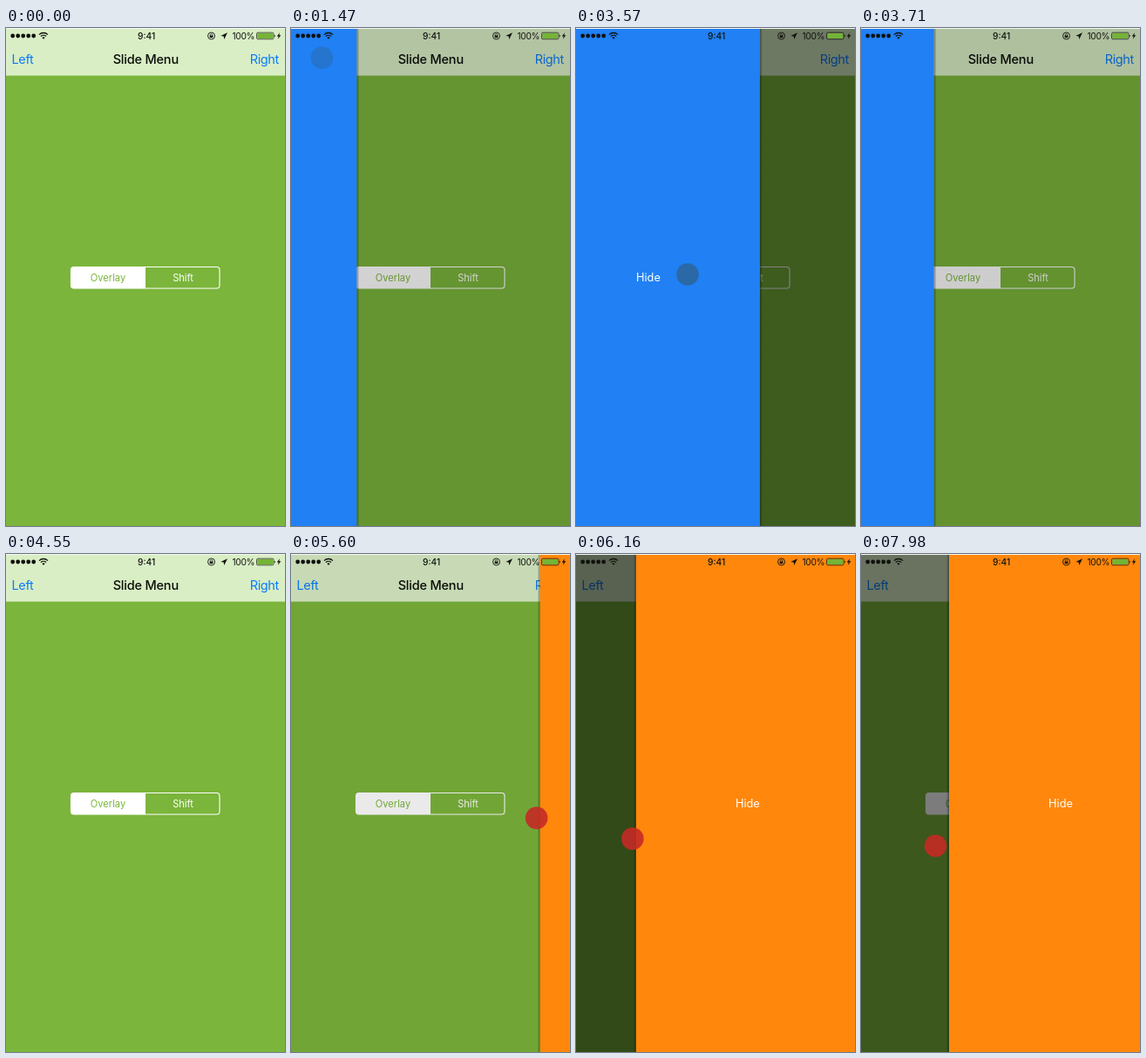
These frames come from a looping animation (320x570 px, 8000 ms). An HTML page:

```html
<!DOCTYPE html>
<html lang="en">
<head>
<meta charset="utf-8">
<title>Slide menu</title>
<style>
  html, body { margin: 0; width: 100%; height: 100%; overflow: hidden; background: #7bb53b; }
  svg { display: block; width: 100vw; height: 100vh; }
  text { font-family: Inter, Roboto, sans-serif; }
  .bar { font-size: 14.5px; letter-spacing: -.35px; fill: #0b7cf8; }
  .title { font-weight: 500; letter-spacing: -.2px; fill: #0a0c08; }
  .seg { font-size: 11.1px; text-anchor: middle; }
  .hide { font-size: 12.8px; text-anchor: middle; fill: #fff; }
  .status { font-size: 10.2px; fill: #10120e; }
</style>
</head>
<body>
<svg viewBox="0 0 320 570">
  <defs>
    <linearGradient id="fade">
      <stop offset="0" stop-color="#000" stop-opacity=".4"/>
      <stop offset="1" stop-color="#000" stop-opacity="0"/>
    </linearGradient>
  </defs>

  <rect width="320" height="570" fill="#7bb53b"/>
  <rect width="320" height="54.5" fill="#d9eec5"/>
  <rect width="320" height="1" fill="#f4f8f0"/>
  <text class="bar" x="6.5" y="41">Left</text>
  <text class="bar title" x="160.3" y="41" text-anchor="middle">Slide Menu</text>
  <text class="bar" x="313" y="41" text-anchor="end">Right</text>

  <path d="M160 273.5H78a3.5 3.5 0 0 0-3.5 3.5v17.500a3.500 3.500 0 0 0 3.500 3.500H160Z" fill="#fff"/>
  <rect x="74.500" y="273.500" width="170.500" height="24.500" rx="3.500" fill="none" stroke="#fff" stroke-width="1.100"/>
  <text class="seg" x="117" y="289.500" fill="#7bb53b">Overlay</text>
  <text class="seg" x="203" y="289.500" fill="#fff">Shift</text>

  <rect id="dim" y="1" width="320" height="569"/>

  <g id="left">
    <rect x="256" y="1" width="3" height="569" fill="url(#fade)"/>
    <rect y="1" width="256" height="569" fill="#2080f4"/>
    <text class="hide" x="128" y="290">Hide</text>
  </g>
  <g id="right">
    <rect x="-3" y="1" width="3" height="569" fill="url(#fade)" transform="matrix(-1 0 0 1 -3 0)"/>
    <rect y="1" width="256" height="569" fill="#ff870c"/>
    <text class="hide" x="128" y="290">Hide</text>
  </g>

  <g fill="#10120e">
    <g id="signal"></g>
    <g fill="none" stroke="#10120e" stroke-width="1.300">
      <path d="M38 7.600a7 7 0 0 1 10 0M39.900 9.600a4.400 4.400 0 0 1 6.200 0"/>
      <circle cx="235.500" cy="9" r="4" stroke-width=".9"/>
      <path d="M234.300 9V7.800a1.200 1.200 0 0 1 2.400 0V9" stroke-width=".7"/>
      <rect x="287.500" y="5.200" width="19.500" height="7.600" rx="1.500" stroke-width=".7"/>
    </g>
    <path d="M41.300 11a2.500 2.500 0 0 1 3.400 0L43 12.800Z"/>
    <rect x="233.700" y="8.600" width="3.600" height="2.500"/>
    <path d="M254 5.200 250.200 13 249.700 9.500 246.300 9Z"/>
    <rect x="288.300" y="6" width="17.900" height="6" rx=".8" fill="#74b436"/>
    <path d="M307.700 7.700a1.400 1.400 0 0 1 0 2.700Z"/>
    <path d="M314 5.200 310.700 9.500H312.700L311.800 12.800 315.300 8.300H313.200Z"/>
    <text class="status" x="161.200" y="12.600" text-anchor="middle" font-weight="500">9:41</text>
    <text class="status" x="259.500" y="12.600" letter-spacing="-.3">100%</text>
  </g>

  <circle id="touch"/>
</svg>
<script>
  const LOOP = 8000, STEP = 70, WIDTH = 256, STAGE = 320;
  const TAP = '#3c4432', DRAG = '#c42a25';
  const $ = id => document.getElementById(id);

  const clamp = v => Math.min(1, Math.max(0, v));
  const span = (t, from, length) => clamp((t - from) / length);
  const ease = u => u < .5 ? 4 * u ** 3 : 1 - 4 * (1 - u) ** 3;

  function set(el, attrs) {
    for (const key in attrs) el.setAttribute(key, attrs[key]);
  }

  // Piecewise linear value through [position, value] points.
  function through(points, x) {
    let i = 1;
    while (i < points.length - 1 && x > points[i][0]) i++;
    const [x0, y0] = points[i - 1], [x1, y1] = points[i];
    return y0 + (y1 - y0) * clamp((x - x0) / (x1 - x0));
  }

  function tap(t, x, y, down, fadeFrom) {
    if (t < down) return null;
    return { x, y, fill: TAP, alpha: .6 * (1 - span(t, fadeFrom, 210)) };
  }

  function pullIn(t) {
    if (t < 5390 || t >= 6440) return null;
    const u = 1 - (1 - span(t, 5530, 840)) ** 1.45;
    return {
      x: 316 - 290 * u,
      y: through([[0, 295], [.115, 302], [.87, 326], [1, 341.5]], u),
      fill: DRAG,
      alpha: t < 5460 ? .5 : .9
    };
  }

  function pushOut(t) {
    if (t < 7770) return null;
    const u = span(t, 7700, 280) ** 1.5;
    return { x: 48.5 + 37 * u, y: 336 - 2 * u, fill: DRAG, alpha: .9 };
  }

  function touchAt(t) {
    if (t < 2000) return tap(t, 35.5, 34, 840, 1330);
    if (t < 5000) return tap(t, 128, 282, 3220, 3500);
    return pullIn(t) || pushOut(t);
  }

  function rightEdge(t) {
    if (t < 5390) return STAGE;
    const touch = touchAt(t);
    if (!touch) return STAGE - WIDTH;
    const grip = t < 7000 ? 4 : 15.5;
    return Math.max(STAGE - WIDTH, touch.x + grip);
  }

  function draw(t) {
    const leftOpen = ease(span(t, 1273, 470)) - ease(span(t, 3338, 657));
    const edge = rightEdge(t);
    const rightOpen = (STAGE - edge) / WIDTH;

    set($('left'), {
      transform: `translate(${(leftOpen - 1) * WIDTH} 0)`,
      visibility: leftOpen > 0 ? 'visible' : 'hidden'
    });
    set($('right'), {
      transform: `translate(${edge} 0)`,
      visibility: rightOpen > 0 ? 'visible' : 'hidden'
    });
    set($('dim'), { opacity: .6 * Math.max(leftOpen, rightOpen) });

    const touch = touchAt(t);
    set($('touch'), touch
      ? { cx: touch.x, cy: touch.y, r: 12.8, fill: touch.fill, opacity: touch.alpha }
      : { opacity: 0 });
  }

  for (let i = 0; i < 5; i++) {
    const dot = document.createElementNS('http://www.w3.org/2000/svg', 'circle');
    set(dot, { cx: 7.7 + 6 * i, cy: 9, r: 2.4 });
    $('signal').append(dot);
  }

  const start = performance.now();
  function frame() {
    const t = (performance.now() - start) % LOOP;
    draw(Math.floor(t / STEP) * STEP);
    requestAnimationFrame(frame);
  }
  frame();
</script>
</body>
</html>
```
